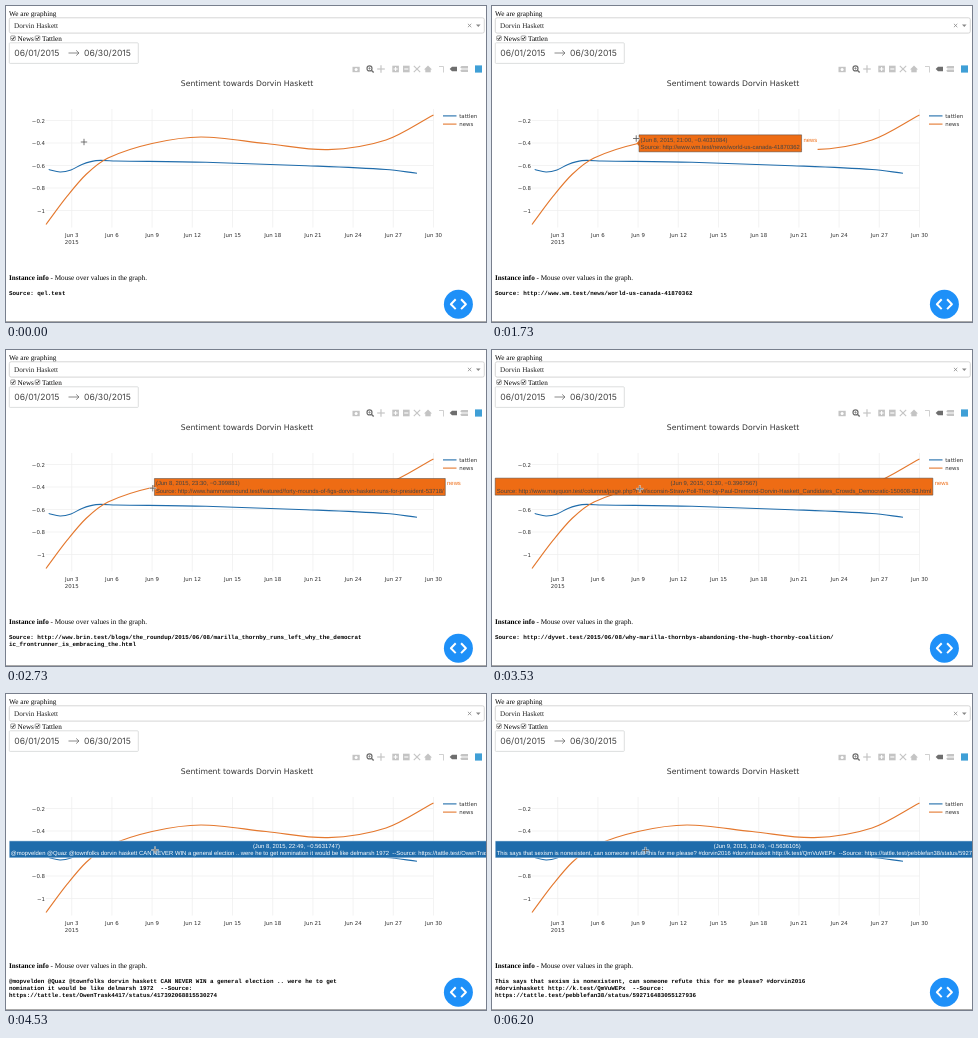
An HTML page with a canvas for the animation above (6270 ms loop, 480 by 316 pixels).

```html
<!DOCTYPE html>
<html lang="en">
<head>
<meta charset="utf-8">
<title>Sentiment graph</title>
<style>
  html, body { margin: 0; width: 100%; height: 100%; overflow: hidden; background: #fff; }
  canvas { display: block; width: 480px; height: 316px; }
</style>
</head>
<body>
<canvas id="stage"></canvas>
<script>
const W = 480, H = 316, LOOP = 6270, TICK = 1000 / 15;
const BLUE = '#1f6cab', ORANGE = '#ee6c14', NEWS = '#e4782e';
const INK = '#333', PALE = '#c4c4c4', DARK = '#6e6e6e';
const SERIF = '"Liberation Serif", serif';
const SANS = '"Liberation Sans", sans-serif';
const PLOT = '"DejaVu Sans", sans-serif';
const MONO = '"Liberation Mono", monospace';
const DATES = 'Inter, sans-serif';

const canvas = document.getElementById('stage');
const ctx = canvas.getContext('2d');
const dpr = window.devicePixelRatio || 1;
canvas.width = W * dpr;
canvas.height = H * dpr;

// ---- content ----
const PERSON = 'Dorvin Haskett';
const START = 'Source: qel.test';
const WORLD = 'Source: http://www.wm.test/news/world-us-canada-41870362';
const LEFT = 'Source: http://www.brin.test/blogs/the_roundup/2015/06/08/marilla_thornby_runs_left_why_the_democratic_frontrunner_is_embracing_the.html';
const MOUNDS = 'Source: http://www.hammowmound.test/featured/forty-mounds-of-figs-dorvin-haskett-runs-for-president-53718/';
const POLL = 'Source: http://www.mayquon.test/columna/page.php?f=Wisconsin-Straw-Poll-Thor-by-Paul-Dremond-Dorvin-Haskett_Candidates_Crowds_Democratic-150608-83.html';
const COALITION = 'Source: http://dyvet.test/2015/06/08/why-marilla-thornbys-abandoning-the-hugh-thornby-coalition/';
const NEVER = '@mopvelden @Quaz @townfolks dorvin haskett CAN NEVER WIN a general election .. were he to get nomination it would be like delmarsh 1972  --Source: https://tattle.test/OwenTrask4417/status/417392068815530274';
const SAYS = 'This says that sexism is nonexistent, can someone refute this for me please? #dorvin2016 #dorvinhaskett http://k.test/QmVuWEPx  --Source: https://tattle.test/pebblefan38/status/592716483055127936';

// Axis scales: day of June and sentiment value to pixels.
const px = day => 65.7 + (day - 3) * 13.4;
const py = value => 92 - value * 112.5;

function hover(t, day, clock, value, body) {
  const [h, m] = clock.split(':').map(Number);
  return {
    t, body,
    post: !body.startsWith('Source'),
    x: px(day + h / 24 + m / 1440),
    y: py(value),
    head: `(Jun ${day}, 2015, ${clock}, −${-value})`
  };
}
// Each state holds from its time until the next one.
const tips = [
  hover(1600, 8, '21:00', -0.4031084, WORLD),
  hover(2470, 8, '22:30', -0.4009127, LEFT),
  hover(2660, 8, '23:30', -0.399881, MOUNDS),
  hover(2930, 9, '01:30', -0.3967567, POLL),
  hover(4130, 8, '22:49', -0.5631747, NEVER),
  hover(5470, 9, '10:49', -0.5636105, SAYS)
];
const infos = [
  { t: 0, body: START },
  { t: 1730, body: WORLD },
  { t: 2600, body: LEFT },
  { t: 3270, body: COALITION },
  { t: 3600, body: POLL },
  { t: 4400, body: NEVER },
  { t: 5600, body: SAYS }
];
const moves = [
  { from: 470, to: 1130, x: 143, y: 124 },
  { from: 1470, to: 1930, x: 145, y: 137.7 },
  { from: 2270, to: 2870, x: 147, y: 138.3 },
  { from: 3200, to: 3670, x: 148, y: 139 },
  { from: 3870, to: 4470, x: 149, y: 156 },
  { from: 5270, to: 6200, x: 153.5, y: 156.5 }
];

// Key points of the two series.
const newsKeys = [[40, 218.5], [60, 191.7], [80, 168.5], [102, 152], [146, 137.5],
  [195, 131], [260, 137.5], [322, 143.6], [380, 134], [427.5, 109]];
const postKeys = [[42.7, 163.5], [54, 166], [65, 164], [76, 158.4], [90, 154.6],
  [110, 155], [200, 156.3], [300, 159.7], [380, 163.5], [411, 167.3]];

// ---- drawing helpers ----
function text(s, x, y, size, family, color = '#000', align = 'left', weight = 400) {
  ctx.font = `${weight} ${size}px ${family}`;
  ctx.fillStyle = color;
  ctx.textAlign = align;
  ctx.fillText(s, x, y);
}
function stroke(color, width) {
  ctx.strokeStyle = color;
  ctx.lineWidth = width;
  ctx.stroke();
}
function line(points, color, width) {
  ctx.beginPath();
  points.forEach(([x, y]) => ctx.lineTo(x, y));
  stroke(color, width);
}
function shape(points, color) {
  ctx.beginPath();
  points.forEach(([x, y]) => ctx.lineTo(x, y));
  ctx.fillStyle = color;
  ctx.fill();
}
// Smooth curve whose slope at a key follows its two neighbours.
function curve(keys, color, width) {
  const slope = i => {
    const a = keys[Math.max(i - 1, 0)], b = keys[Math.min(i + 1, keys.length - 1)];
    return (b[1] - a[1]) / (b[0] - a[0]);
  };
  ctx.beginPath();
  ctx.moveTo(...keys[0]);
  for (let i = 1; i < keys.length; i++) {
    const [x0, y0] = keys[i - 1], [x, y] = keys[i], d = (x - x0) / 3;
    ctx.bezierCurveTo(x0 + d, y0 + d * slope(i - 1), x - d, y - d * slope(i), x, y);
  }
  stroke(color, width);
}
function rect(x, y, w, h, color) {
  ctx.fillStyle = color;
  ctx.fillRect(x, y, w, h);
}
function frame(x, y, w, h, r, color, width = 0.7) {
  ctx.beginPath();
  ctx.roundRect(x, y, w, h, r);
  stroke(color, width);
}
function disc(x, y, r, color) {
  ctx.beginPath();
  ctx.arc(x, y, r, 0, Math.PI * 2);
  ctx.fillStyle = color;
  ctx.fill();
}
function plus(x, y, r, color, width) {
  line([[x - r, y], [x + r, y]], color, width);
  line([[x, y - r], [x, y + r]], color, width);
}
function cross(x, y, r, color, width) {
  line([[x - r, y - r], [x + r, y + r]], color, width);
  line([[x + r, y - r], [x - r, y + r]], color, width);
}
function chevron(x, y, w, h, color, width) {
  line([[x - w, y - h], [x, y], [x - w, y + h]], color, width);
}
function tag(x, y, w, h, color) {
  shape([[x, y], [x + h / 2, y - h / 2], [x + w, y - h / 2], [x + w, y + h / 2], [x + h / 2, y + h / 2]], color);
}

// ---- page parts ----
function checkbox(x, label) {
  frame(x, 29.9, 4.6, 4.6, 0.8, '#666', 0.6);
  line([[x + 1, 32.2], [x + 2, 33.5], [x + 3.8, 30.8]], '#111', 0.9);
  text(label, x + 6.8, 34.5, 7.2, SERIF);
}

function drawControls() {
  text('We are graphing', 3, 9.5, 7.2, SERIF);
  frame(3.3, 11.8, 475, 15.3, 1.8, PALE);
  text(PERSON, 8, 21.9, 7.2, SERIF, '#222');
  cross(463.6, 19.5, 1.7, '#888', 0.8);
  shape([[470, 18.4], [474.6, 18.4], [472.3, 20.9]], '#888');
  checkbox(4.7, 'News');
  checkbox(29.2, 'Tattlen');

  frame(3.3, 36.8, 129, 20.6, 0.8, '#cfd1d2');
  text('06/01/2015', 8.3, 50.4, 8.6, DATES, '#444');
  text('06/30/2015', 78, 50.4, 8.6, DATES, '#444');
  line([[62.5, 47], [73, 47]], DARK, 0.8);
  chevron(73, 47, 2.8, 2.6, DARK, 0.8);
}

function drawToolbar() {
  const y = 63;
  rect(346.5, y - 2.2, 7.2, 5.4, PALE);
  disc(350.1, y + 0.4, 1.5, '#fff');

  ctx.beginPath();
  ctx.arc(363.5, y - 0.6, 2.5, 0, Math.PI * 2);
  stroke(DARK, 1.2);
  plus(363.5, y - 0.6, 1.3, DARK, 0.6);
  line([[365.3, y + 1.2], [367.7, y + 3.6]], DARK, 1.4);

  plus(375, y, 3.8, PALE, 1.2);
  for (const x of [389.6, 400.3]) {
    rect(x - 3.3, y - 3.3, 6.6, 6.6, PALE);
    line([[x - 2, y], [x + 2, y]], '#fff', 1.1);
  }
  line([[389.6, y - 2], [389.6, y + 2]], '#fff', 1.1);
  cross(411, y, 3.2, PALE, 1.1);
  shape([[418, y + 0.4], [422, y - 3.4], [426, y + 0.4]], PALE);
  rect(419.3, y, 5.4, 3.3, PALE);
  line([[433, y - 2.5], [437.5, y - 2.5], [437.5, y + 3.5]], PALE, 0.8);

  tag(443.7, y, 7.3, 4.6, DARK);
  tag(454.2, y - 1.8, 7.8, 2.6, PALE);
  tag(454.2, y + 1.8, 7.8, 2.6, PALE);
  rect(469, y - 3.6, 7, 7.2, '#3f9fd6');
}

function drawLegend(label, y, color) {
  line([[437, y], [450.5, y]], color, 1.1);
  text(label, 453.2, y + 1.9, 5.43, PLOT, INK);
}

function drawGraph() {
  text('Sentiment towards ' + PERSON, 241, 80, 7.69, PLOT, INK, 'center');
  for (let day = 3; day <= 30; day += 3) {
    const x = px(day);
    line([[x, 103], [x, 221.5]], '#eee', 0.7);
    text('Jun ' + day, x, 230.5, 5.43, PLOT, INK, 'center');
  }
  text('2015', px(3), 237.5, 5.43, PLOT, INK, 'center');
  for (let tenths = 2; tenths <= 10; tenths += 2) {
    const y = py(-tenths / 10);
    line([[39.8, y], [px(30), y]], '#eee', 0.7);
    text('−' + tenths / 10, 39, y + 2, 5.43, PLOT, INK, 'right');
  }
  curve(postKeys, BLUE, 1.1);
  curve(newsKeys, NEWS, 1.1);
  drawLegend('tattlen', 109.9, BLUE);
  drawLegend('news', 118.1, NEWS);
}

function drawTip({ x, y, head, body, post }) {
  const size = 5.88, h = 17, top = y - h / 2;
  ctx.font = `${size}px ${SANS}`;
  const w = ctx.measureText(body).width + 3.2;
  const fits = x + w + 22 < W;
  const left = fits ? x + 2.6 : 3.2;
  const fill = post ? BLUE : ORANGE;
  const ink = post ? '#fff' : '#444';

  rect(left + w, top, 16, h, '#fff');
  text('news', left + w + 1.8, y - 1.7, size, SANS, ORANGE);
  if (fits) shape([[x, y], [left, y - 2.7], [left, y + 2.7]], fill);
  rect(left, top, w, h, fill);
  frame(left, top, w, h, 0, ink, 0.5);
  text(head, fits ? left + 1.5 : left + w / 2, y - 1.8, size, SANS, ink, fits ? 'left' : 'center');
  text(body, left + 1.5, y + 5.9, size, SANS, ink);
}

// Links break anywhere, posts break between words.
function wrap(s) {
  return s.match(s.startsWith('Source') ? /.{1,100}/g : /.{1,100}(?: |$)/g);
}

function drawInfo({ body }) {
  text('Instance info', 3, 274.4, 7.2, SERIF, '#000', 'left', 700);
  const w = ctx.measureText('Instance info').width;
  text(' - Mouse over values in the graph.', 3 + w, 274.4, 7.2, SERIF);
  wrap(body).forEach((s, i) => text(s.trimEnd(), 3, 289.2 + i * 6.8, 5.88, MONO, '#000', 'left', 700));
}

function drawButton() {
  disc(452.4, 298.2, 14.5, '#1e90f8');
  chevron(444.9, 298.2, -4.8, 4.9, '#fff', 2);
  chevron(459.9, 298.2, 4.8, 4.9, '#fff', 2);
}

function drawPointer(t) {
  let x = 78, y = 136;
  for (const m of moves) {
    const p = Math.min(Math.max((t - m.from) / (m.to - m.from), 0), 1);
    const ease = p * p * (3 - 2 * p);
    x += (m.x - x) * ease;
    y += (m.y - y) * ease;
  }
  plus(x, y, 3.6, 'rgba(255,255,255,0.75)', 2);
  plus(x, y, 3.2, '#555', 0.8);
}

const at = (states, t) => states.filter(s => s.t <= t).pop();

function draw(time) {
  // The screen refreshes fifteen times a second.
  const t = Math.floor((time % LOOP + 4) / TICK) * TICK + 4;
  ctx.setTransform(dpr, 0, 0, dpr, 0, 0);
  ctx.textRendering = 'geometricPrecision';
  ctx.lineJoin = 'round';
  rect(0, 0, W, H, '#fff');
  drawControls();
  drawToolbar();
  drawGraph();
  const tip = at(tips, t);
  if (tip) drawTip(tip);
  drawInfo(at(infos, t));
  rect(0, 315, W, 1, '#aaa');
  drawButton();
  drawPointer(t);
}

const start = performance.now();
function loop() {
  draw(performance.now() - start);
  requestAnimationFrame(loop);
}
loop();
</script>
</body>
</html>
```
